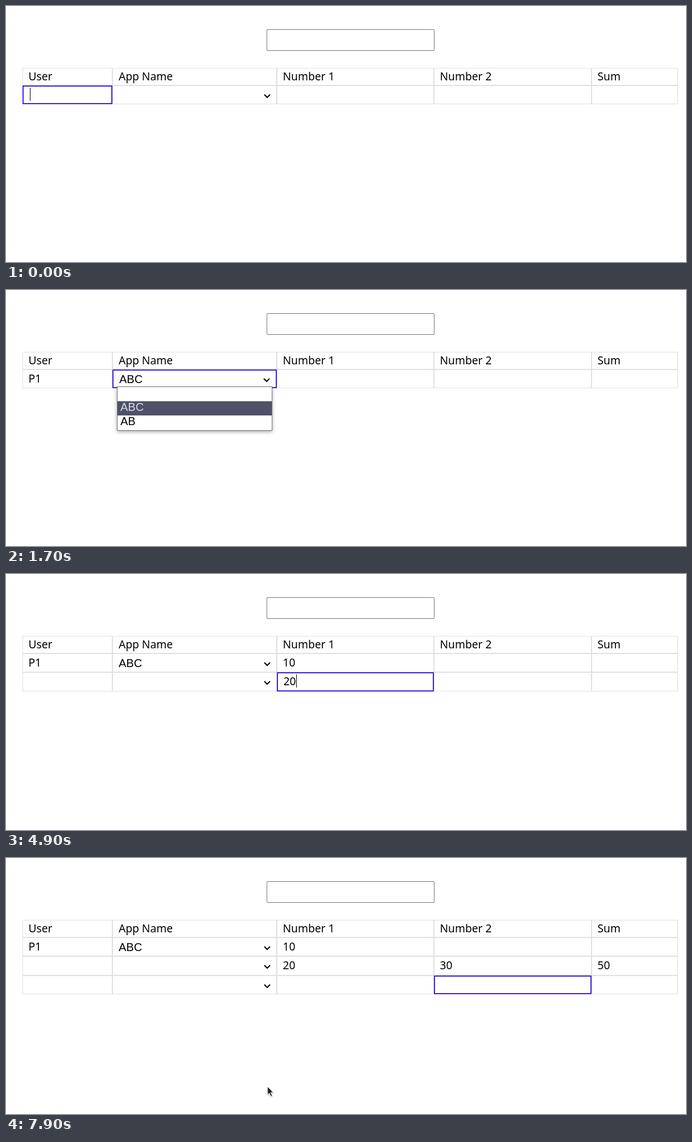
These frames come from a looping animation (1195x451 px, 8 s). An HTML page:

```html
<!DOCTYPE html>
<html lang="en">
<head>
<meta charset="utf-8">
<title>Editable table</title>
<style>
  html, body { margin: 0; width: 100%; height: 100%; overflow: hidden; background: #fff; }
  svg { display: block; width: 1195px; height: 451px; }
  text { font: 19.2px "Noto Sans", "Open Sans", sans-serif; white-space: pre; }
  .option { font: 20px "Liberation Sans", Arial, sans-serif; }
  .cell { fill: none; stroke: #e0e0e0; }
  .focus { fill: none; stroke: #4422dd; stroke-width: 2; }
  .field { fill: #fff; stroke: #767676; }
  .arrow { fill: none; stroke: #000; stroke-width: 2; }
  .menu { fill: #fff; stroke: #767676; filter: drop-shadow(0 2px 3px rgba(0, 0, 0, .35)); }
  .pick { fill: #4d526a; }
  .mouse { fill: #222; stroke: #fff; stroke-width: 1; filter: drop-shadow(0 1px 1px rgba(0, 0, 0, .35)); }
</style>
</head>
<body>
<svg id="stage" viewBox="0 0 1195 451"></svg>
<script>
const LOOP = 8000;
const COLS = [29, 187, 476, 752, 1029, 1181];
const ROWS = [109, 140, 173, 207, 240];
const TITLES = ["User", "App Name", "Number 1", "Number 2", "Sum"];
const CARET_X = { 0: 42, 2: 488, 3: 764.7 };
const CARET_Y = [0, 144, 178, 211];
const DIGIT = 10.8;

// Each step changes part of the state; "set" fills table cells by row and column.
const STEPS = [
  { t: 0, rows: 1, focus: [1, 0], caret: true },
  { t: 400, set: { "1,0": "P1" } },
  { t: 1000, focus: [1, 1], caret: false },
  { t: 1400, menu: 0 },
  { t: 1700, menu: 1, set: { "1,1": "ABC" } },
  { t: 2000, menu: -1 },
  { t: 2200, focus: [1, 2] },
  { t: 2500, caret: true },
  { t: 3200, set: { "1,2": "1" } },
  { t: 3300, set: { "1,2": "10" } },
  { t: 3600, rows: 2, focus: [2, 2], caret: false },
  { t: 4000, caret: true },
  { t: 4600, caret: false },
  { t: 4700, caret: true, set: { "2,2": "2" } },
  { t: 4900, set: { "2,2": "20" } },
  { t: 5100, focus: [2, 3], caret: false },
  { t: 5500, caret: true },
  { t: 6000, set: { "2,3": "3" } },
  { t: 6100, set: { "2,3": "30" } },
  { t: 6700, rows: 3, focus: [3, 3], caret: false, set: { "2,4": "50" } },
  { t: 6900, caret: true },
  { t: 7500, caret: false },
  { t: 7700, mouse: [425, 431] },
  { t: 7900, mouse: [460, 403] }
];

const rect = (cls, x, y, w, h, extra = "") =>
  `<rect class="${cls}" x="${x}" y="${y}" width="${w}" height="${h}" ${extra}/>`;
const text = (x, y, s, extra = "") => `<text x="${x}" y="${y}" ${extra}>${s}</text>`;

function stateAt(time) {
  const state = { cells: {}, menu: -1, mouse: null };
  for (const { t, set, ...rest } of STEPS) {
    if (t > time) break;
    Object.assign(state, rest);
    Object.assign(state.cells, set);
  }
  return state;
}

function drawCell(state, r, c) {
  const x = COLS[c], y = ROWS[r];
  const w = COLS[c + 1] - x, h = ROWS[r + 1] - y;
  const active = state.focus[0] === r && state.focus[1] === c;
  const value = r ? state.cells[[r, c]] || "" : TITLES[c];
  const shift = active ? 1 : 0;
  let out = active
    ? rect("focus", x + 1, y + 1, w - 2, h - 2)
    : rect("cell", x + .5, y + .5, w - 1, h - 1);

  if (r && c === 1) {
    out += text(x + 11 + shift, y + 24, value, 'class="option"');
    out += `<path class="arrow" d="M${x + 267 - shift} ${y + 16}l5 5l5 -5"/>`;
  } else {
    const left = c === 1 ? 11 : 10.5;
    out += text(x + left + shift, y + (r ? 23 : 22), value);
  }
  if (active && state.caret) {
    const top = CARET_Y[r] - (r === 2 && value ? 1 : 0);
    out += rect("caret", Math.round(CARET_X[c] + DIGIT * value.length), top, 1, 23);
  }
  return out;
}

function drawMenu(picked) {
  let out = rect("menu", 195.5, 170.5, 272, 77);
  out += rect("pick", 196, 171 + 25 * picked, 271, 25);
  ["", "ABC", "AB"].forEach((name, i) => {
    const fill = i === picked ? "#d8dae2" : "#000";
    out += text(201, 188 + 25 * i, name, `class="option" fill="${fill}"`);
  });
  return out;
}

function draw(state) {
  let out = rect("field", 458.5, 41.5, 294, 37, 'rx="1.5"');
  for (let r = 0; r <= state.rows; r++)
    for (let c = 0; c < TITLES.length; c++) out += drawCell(state, r, c);
  if (state.menu >= 0) out += drawMenu(state.menu);
  if (state.mouse)
    out += `<path class="mouse" transform="translate(${state.mouse})"
      d="M-.5 -.5V14.2L2.8 11.2L5.4 17L8 15.9L5.4 10.2H9.8Z"/>`;
  return out;
}

const stage = document.getElementById("stage");
const start = performance.now();
let shown = "";

function tick() {
  const next = draw(stateAt((performance.now() - start) % LOOP));
  if (next !== shown) stage.innerHTML = shown = next;
  requestAnimationFrame(tick);
}
tick();
</script>
</body>
</html>
```
